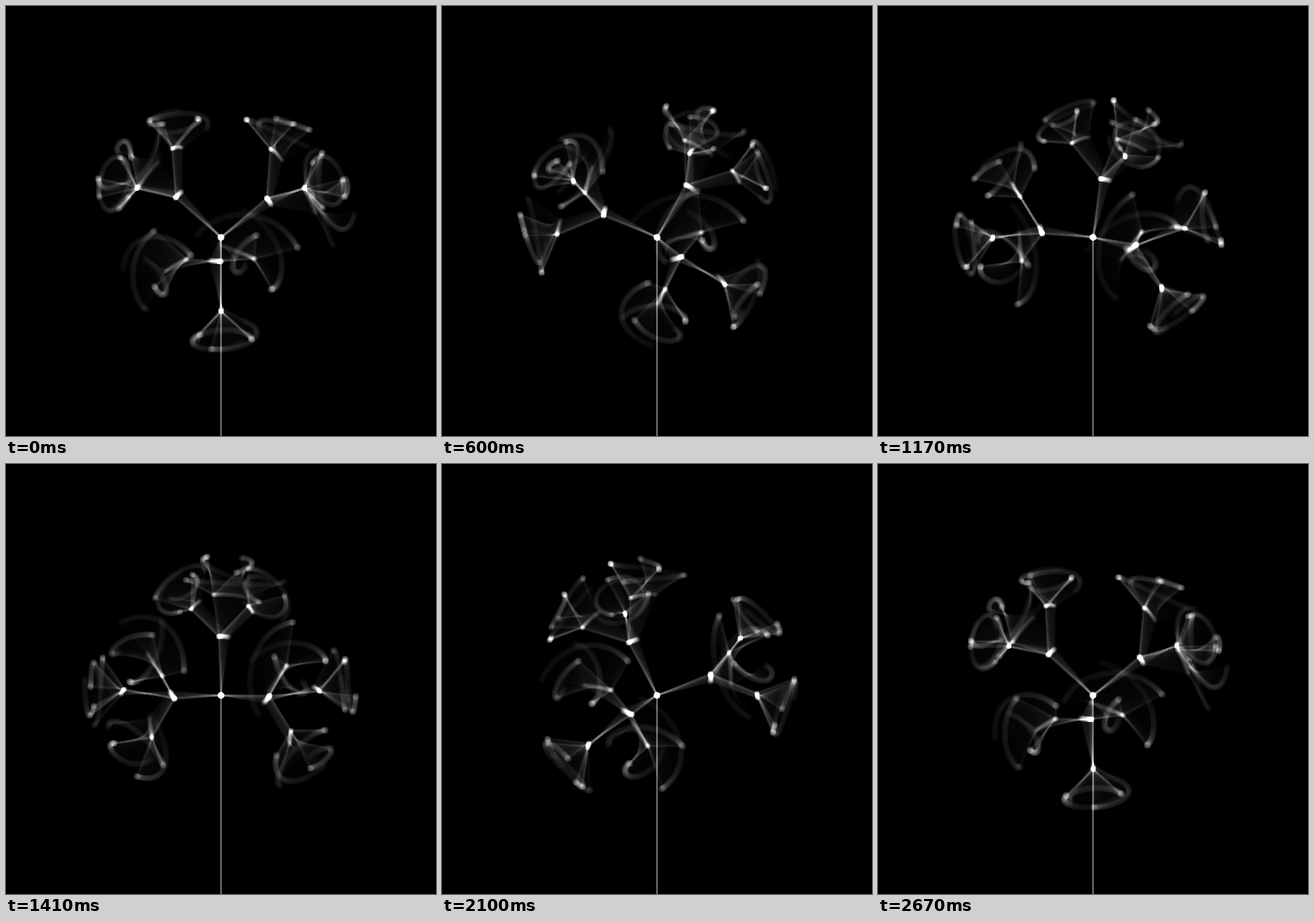
Recreate the animation shown at these times as an HTML page with a canvas. Size 500 by 500 pixels, loop 2700 ms.

```html
<!DOCTYPE html>
<html>
<head>
<meta charset="utf-8">
<style>
html, body { margin: 0; width: 100%; height: 100%; overflow: hidden; background: #000; }
canvas { display: block; width: 500px; height: 500px; }
</style>
</head>
<body>
<canvas id="stage" width="500" height="500"></canvas>
<script>
const ctx = document.getElementById('stage').getContext('2d');
const FRAMES = 90, FRAME_MS = 30, SAMPLES = 128, TRAIL = 9;
const EYE = 933, TAU = Math.PI * 2, TILT = 0.883;
const ROOT = [0, 19, 0];

// turns per loop, start angle, arm length, opening angle
const LEVELS = [
  { turns: -1 / 3, start: TAU / 4, len: 70, open: TAU / 6, dot: 3, glow: 1.9, line: 0.62 },
  { turns: 1, start: 0, len: 56.5, open: TAU / 8, dot: 2.5, glow: 1.7, line: 0.62 },
  { turns: 4, start: 0.35, len: 45.5, open: TAU / 8, dot: 3.1, glow: 1.7, line: 0.75 }
];

const mix = (a, p, b, q) => a.map((v, i) => v * p + b[i] * q);
const gray = v => `rgba(255,255,255,${v})`;

function project([x, y, z]) {
  const s = EYE / (EYE - z);
  return [250 + x * s, 250 + y * s, s];
}

function line(a, b, v) {
  ctx.strokeStyle = gray(v);
  ctx.beginPath();
  ctx.moveTo(a[0], a[1]);
  ctx.lineTo(b[0], b[1]);
  ctx.stroke();
}

function dot(p, r, v) {
  ctx.fillStyle = gray(v);
  ctx.beginPath();
  ctx.arc(p[0], p[1], r * p[2], 0, TAU);
  ctx.fill();
}

// Three arms spread on a cone around axis; u and v span its base.
function grow(depth, t, pos, axis, u, v) {
  const L = LEVELS[depth], from = project(pos);
  const c = Math.cos(L.open), s = Math.sin(L.open);
  for (let i = 0; i < 3; i++) {
    const a = L.start + TAU * (L.turns * t + i / 3);
    const out = mix(u, Math.cos(a), v, Math.sin(a));
    const side = mix(u, -Math.sin(a), v, Math.cos(a));
    const dir = mix(axis, c, out, s);
    const end = mix(pos, 1, dir, L.len), to = project(end);
    line(from, to, L.line / SAMPLES);
    dot(to, L.dot, L.glow / SAMPLES);
    if (depth < 2) grow(depth + 1, t, end, dir, mix(out, c, axis, -s), side);
  }
}

function draw(frame) {
  ctx.globalCompositeOperation = 'source-over';
  ctx.fillStyle = '#000';
  ctx.fillRect(0, 0, 500, 500);
  ctx.globalCompositeOperation = 'lighter';
  ctx.lineWidth = 1.3;
  const c = Math.cos(TILT), s = Math.sin(TILT);
  for (let i = 0; i < SAMPLES; i++) {
    const age = TRAIL * ((i + 0.5) / SAMPLES) ** 2;
    grow(0, (frame - age) / FRAMES, ROOT, [0, -c, s], [1, 0, 0], [0, s, c]);
  }
  line([250, 500], [250, 269], 0.6);
  dot([250, 269, 1], 3.8, 1);
}

let shown = -1;
function tick(now) {
  const frame = Math.floor(now / FRAME_MS) % FRAMES;
  if (frame !== shown) draw(shown = frame);
  requestAnimationFrame(tick);
}
draw(shown = 0);
requestAnimationFrame(tick);
</script>
</body>
</html>
```
